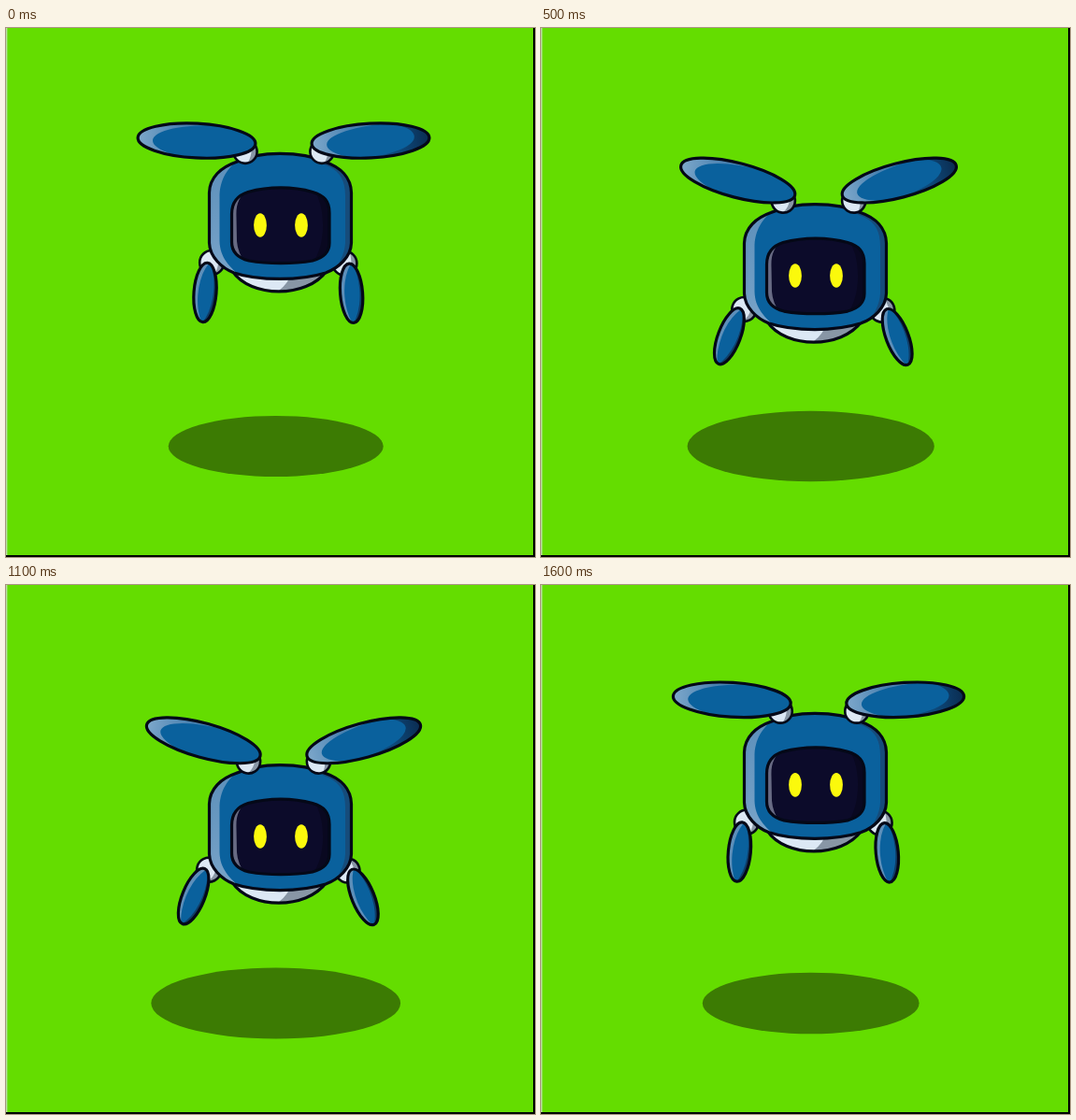
Recreate the animation shown at these times as an HTML page with a canvas. Size 566x566 px, loop 1.7 s.

```html
<!DOCTYPE html>
<html>
<head>
<meta charset="utf-8">
<style>
html, body { margin: 0; width: 100%; height: 100%; overflow: hidden; background: #64dd00; }
canvas { display: block; }
</style>
</head>
<body>
<canvas id="stage" width="566" height="566"></canvas>
<script>
const ctx = document.getElementById('stage').getContext('2d');
const LOOP = 1700, STEP = 100, DEG = Math.PI / 180;
const BLUE = '#0a619d', DARK = '#0f3c66', INK = '#040817';
const WHITE = '#dce8f4', GREY = '#8896a5', NAVY = '#0c0b2a';

function ellipsePath(x, y, rx, ry) {
  const p = new Path2D();
  p.ellipse(x, y, rx, ry, 0, 0, Math.PI * 2);
  return p;
}

function fill(path, color) {
  ctx.fillStyle = color;
  ctx.fill(path);
}

function fade(x0, y0, x1, y1, from, to) {
  const g = ctx.createLinearGradient(x0, y0, x1, y1);
  g.addColorStop(0, from);
  g.addColorStop(1, to);
  return g;
}

// Fills whatever lies outside the hole; callers clip to the part first.
function fillAround(hole, color) {
  const p = new Path2D();
  p.rect(-600, -600, 1800, 1800);
  p.addPath(hole);
  ctx.fillStyle = color;
  ctx.fill(p, 'evenodd');
}

function part(path, color, shade, width = 3.2) {
  ctx.save();
  ctx.clip(path);
  fill(path, color);
  shade();
  ctx.restore();
  ctx.strokeStyle = INK;
  ctx.lineWidth = width;
  ctx.stroke(path);
}

function ball(x, y, r) {
  part(ellipsePath(x, y, r, r), WHITE, () =>
    fillAround(ellipsePath(x - 6, y - 2, r, r + 6), GREY), 2.6);
}

function pivot(x, y, angle, draw) {
  ctx.save();
  ctx.translate(x, y);
  ctx.rotate(angle);
  draw();
  ctx.restore();
}

// side is 1 for the left limb and -1 for its mirrored partner
function wing(side, lift) {
  pivot(297 - side * 33, 147.6, side * lift * 15 * DEG, () => {
    ball(-side * 8, -15.3, 12.6);
    ctx.translate(-side * 60, -27);
    ctx.rotate(side * 3 * DEG);
    part(ellipsePath(0, 0, 63, 18.4), BLUE, () => {
      fillAround(ellipsePath(25, 2, 72, 19.5), fade(-63, 0, -20, 0, '#7ea8cb', '#4a82b1'));
      if (side < 0) fillAround(ellipsePath(-25, -2, 72, 21), fade(30, 0, 63, 0, '#0d4a7c', '#0b2c50'));
    });
  });
}

function arm(side, lift) {
  pivot(291.3 - side * 58.6, side > 0 ? 239 : 239.8, side * lift * 21 * DEG, () => {
    ball(-side * 12.5, 12, 13);
    ctx.translate(-side * 19.7, 44);
    ctx.rotate(side * 4.5 * DEG);
    part(ellipsePath(0, 0, 12, 31.8), BLUE, () => {
      fillAround(ellipsePath(12, 3, 19.5, 40), '#5d8fba');
      fillAround(ellipsePath(-12, -3, 21, 42), DARK);
    });
  });
}

const belly = new Path2D('M242 260C252 275 272 282 292 282C312 282 332 275 343 260Z');
const bellyShade = new Path2D('M306 260Q303 274 288 284L345 284L345 258Z');
const shell = new Path2D('M217.5 176C218 160 230 149 246 143.5C260 137 276 134.5 293 134.5' +
  'C312 134.5 328 137 342 143.5C358 149 369 160 369.5 176L369.5 230C369 245 356 257 342 262' +
  'C326 267 311 268.5 293 268.5C275 268.5 259 267 244 262C231 257 218 245 217.5 230Z');
const shellLight = new Path2D('M210 130L262 130C240 146 230 157 228.5 178L228.5 228' +
  'C229 246 239 256 256 270L210 270Z');
const shellDark = new Path2D('M328 130Q333 145 345 148C358 154 363 164 363 180L363 230' +
  'Q362 249 342 270L380 270L380 130Z');
const visor = new Path2D('M241.5 199C241.5 186 248 179 259 175.5C281 169.5 307 169.5 328 175.5' +
  'C340 179 346 185 346 198L346 230C346 241 339 246 328 249C308 252.5 280 252.5 260 249' +
  'C248 246 241.5 240 241.5 229Z');
const visorLight = new Path2D('M236 170L262 170C249 180 246 188 246.5 202L247 228' +
  'Q248 242 258 254L236 254Z');
const visorDark = new Path2D('M326 168Q339 184 339 211Q339 238 326 254L350 254L350 168Z');

function head() {
  part(belly, WHITE, () => fill(bellyShade, GREY));
  part(shell, BLUE, () => {
    fill(shellLight, fade(0, 140, 0, 262, '#5c8fba', '#78a3c8'));
    fill(shellDark, '#164c7b');
  });
  part(visor, NAVY, () => {
    fill(visorLight, '#686b84');
    fill(visorDark, '#090820');
  });
  for (const x of [272, 316]) fill(ellipsePath(x, 211, 6.9, 12.8), '#fbf90c');
}

function draw(time) {
  const drop = 33.05 + 39.2 * Math.cos(Math.PI * (time - 820) / 1000);
  const lift = drop / 69.5;

  ctx.fillStyle = '#64dd00';
  ctx.fillRect(0, 0, 566, 566);
  fill(ellipsePath(288.7, 447.5, 115 + 22 * lift, 32.6 + 6.5 * lift), '#3c7b03');

  ctx.save();
  ctx.translate(0, drop);
  arm(1, lift);
  arm(-1, lift);
  head();
  wing(1, lift);
  wing(-1, lift);
  ctx.restore();

  ctx.fillStyle = '#b9e09f';
  ctx.fillRect(0, 0, 1.4, 566);
  ctx.fillStyle = '#000';
  ctx.fillRect(564, 0, 2, 566);
  ctx.fillRect(0, 564, 566, 2);
}

const start = performance.now();
function tick() {
  const time = (performance.now() - start) % LOOP;
  draw(Math.floor(time / STEP) * STEP);
  requestAnimationFrame(tick);
}
tick();
</script>
</body>
</html>
```
